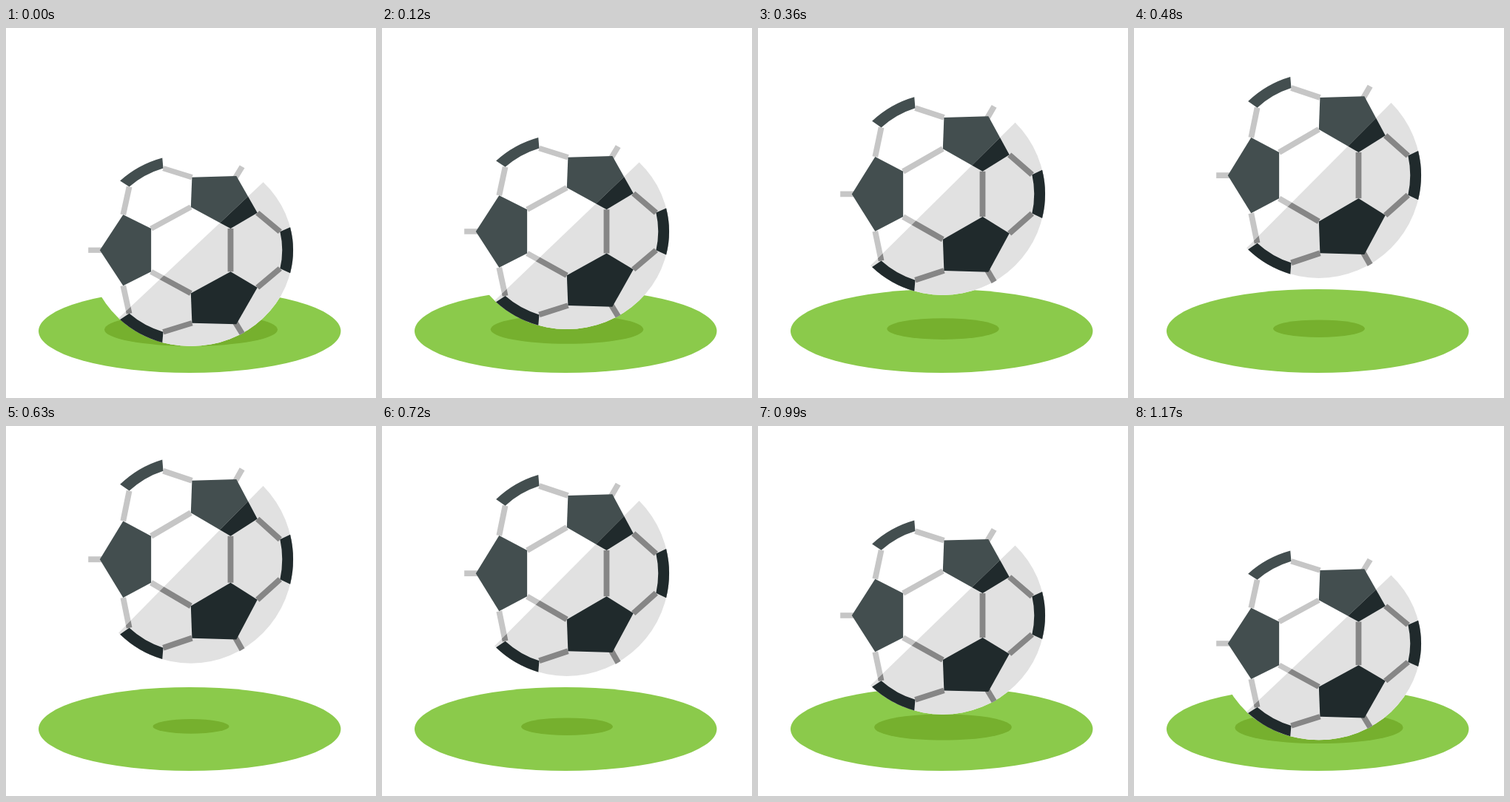
Recreate the animation shown at these times as an HTML page with a canvas. Size 500 by 500 pixels, loop 1.2 s.

```html
<!DOCTYPE html>
<html lang="en">
<head>
<meta charset="utf-8">
<title>Bouncing ball</title>
<style>
html, body { margin: 0; width: 100%; height: 100%; overflow: hidden; background: #fff; }
canvas { display: block; width: 500px; height: 500px; }
</style>
</head>
<body>
<canvas id="stage" width="500" height="500"></canvas>
<script>
const ctx = document.getElementById('stage').getContext('2d');
const LOOP = 1200, STEP = 30;
const R = 138.2, INNER = R * 0.893;
const THIRD = Math.PI * 2 / 3, DEG = Math.PI / 180;
const LIT = { base: '#fff', seam: '#c6c6c6', patch: '#434e4f' };
const SHADED = { base: '#e1e1e1', seam: '#868686', patch: '#202a2c' };

// One third of the ball: the left pentagon, the right rim patch and their seams
const pentagon = [[-123, 0], [-91.5, -51], [-53.7, -31], [-53.7, 31], [-91.5, 51]];
const rimOuter = 13.8 * DEG, rimInner = 12.4 * DEG;
const corner = angle => [INNER * Math.cos(angle), INNER * Math.sin(angle)];
const seams = [
  [[-120, 0], [-138.6, 0]],
  [[-53.7, -31], [0, -62]],
  [[-91.5, -51], corner(-THIRD - rimInner)],
  [[-91.5, 51], corner(THIRD + rimInner)]
];

function ellipse(x, y, rx, ry, color) {
  ctx.fillStyle = color;
  ctx.beginPath();
  ctx.ellipse(x, y, rx, ry, 0, 0, Math.PI * 2);
  ctx.fill();
}

function tracePath(points) {
  ctx.beginPath();
  points.forEach(p => ctx.lineTo(...p));
}

function inThirds(paint) {
  for (let i = 0; i < 3; i++) {
    ctx.save();
    ctx.rotate(i * THIRD);
    paint();
    ctx.restore();
  }
}

function drawSeams() {
  for (const seam of seams) {
    tracePath(seam);
    ctx.stroke();
  }
}

function drawPatches() {
  tracePath(pentagon);
  ctx.fill();
  ctx.beginPath();
  ctx.arc(0, 0, R, -rimOuter, rimOuter);
  ctx.arc(0, 0, INNER, rimInner, -rimInner, true);
  ctx.fill();
}

function drawBall(colors) {
  ellipse(0, 0, R, R, colors.base);
  ctx.strokeStyle = colors.seam;
  ctx.lineWidth = 7.8;
  inThirds(drawSeams);
  ctx.fillStyle = colors.patch;
  inThirds(drawPatches);
}

function draw(time) {
  const height = 1 - Math.abs(time / (LOOP / 2) - 1);
  const shadow = 117 - 69 * height;

  ctx.fillStyle = '#fff';
  ctx.fillRect(0, 0, 500, 500);
  ellipse(248.2, 409.5, 204.2, 56.5, '#8bca4b');
  ellipse(250, 407.6 - 1.8 * height, shadow, shadow * 0.19, '#76b02e');

  ctx.save();
  ctx.translate(249.8, 300.2 - 126.3 * height);
  ctx.scale(1, 0.94 + 0.08 * height);
  drawBall(LIT);
  tracePath([[200, -200], [200, 200], [-200, 200]]);
  ctx.clip();
  drawBall(SHADED);
  ctx.restore();
}

function tick() {
  const time = performance.now() % LOOP;
  draw(Math.floor(time / STEP) * STEP);
  requestAnimationFrame(tick);
}
tick();
</script>
</body>
</html>
```
